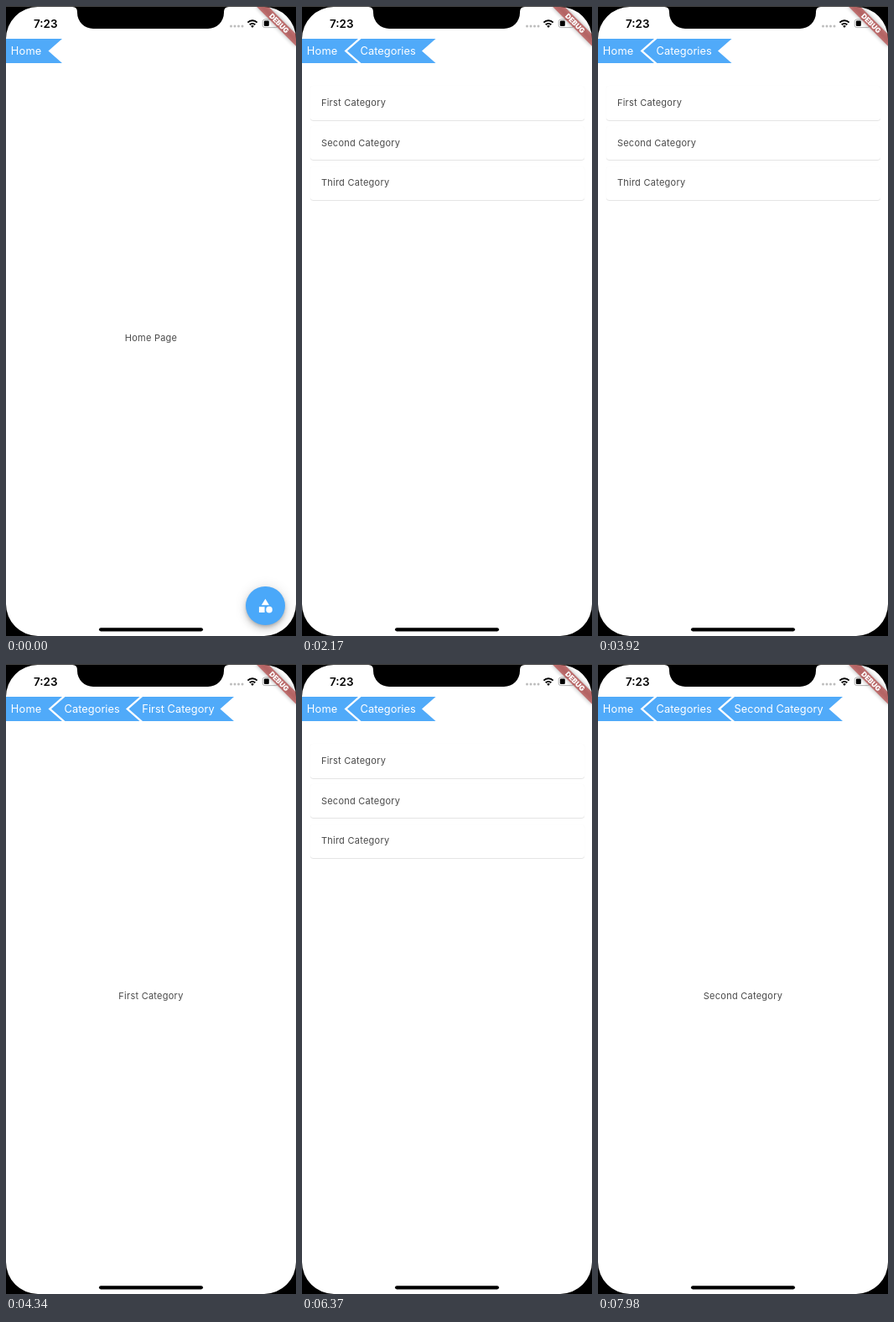
An HTML page for the animation above (8000 ms loop, 346 by 750 pixels).

```html
<!DOCTYPE html>
<html lang="en">
<head>
<meta charset="utf-8">
<title>Breadcrumb navigation</title>
<style>
html, body { margin: 0; width: 100%; height: 100%; overflow: hidden; background: #000; }
#stage { position: relative; width: 346px; height: 750px; overflow: hidden; font-family: Inter, Roboto, sans-serif; }
.page { position: absolute; inset: 0; background: #fff; }
.page + .page::before {
  content: ""; position: absolute; left: -10px; width: 10px; height: 100%;
  background: linear-gradient(90deg, #0000000c, #00000016 50%, #00000034);
}
svg { position: absolute; left: 0; top: 0; width: 346px; height: 750px; }
.crumb { fill: #50aaf9; }
.crumb + text { fill: #fff; font-size: 12.8px; }
.body { fill: #4a4a4a; font-size: 11px; letter-spacing: .25px; }
.card {
  position: absolute; left: 9.5px; width: 327px; height: 40.3px; border-radius: 3.3px; background: #fff;
  box-shadow: 0 .8px .6px #0000001c, 0 .4px 1.5px #0000000c;
}
.fab {
  position: absolute; left: 286px; top: 690.6px; width: 46.8px; height: 46.8px; border-radius: 50%; background: #4aa8f9;
  box-shadow: 0 2.5px 4.2px -.8px #0003, 0 5px 8.4px #00000024, 0 .8px 15px #0000001f;
}
</style>
</head>
<body>
<div id="stage">
  <div class="page" id="home"></div>
  <div class="page" id="list"></div>
  <div class="page" id="first"></div>
  <div class="page" id="second"></div>
  <svg viewBox="0 0 346 750">
    <text x="33" y="25.8" font-size="13.4" font-weight="600">7:23</text>
    <g fill="#bdbdbd">
      <circle cx="268.5" cy="24" r="1.5"/><circle cx="273" cy="24" r="1.5"/>
      <circle cx="277.5" cy="24" r="1.5"/><circle cx="282" cy="24" r="1.5"/>
    </g>
    <g fill="none" stroke="#000" stroke-width="2">
      <path d="M288.4 19.6a8 8 0 0 1 11.2 0"/>
      <path d="M290.7 22.2a4.8 4.8 0 0 1 6.6 0"/>
    </g>
    <path d="M292.1 23.8a2.8 2.8 0 0 1 3.8 0L294 25.9z"/>
    <rect x="306.2" y="16" width="18" height="9.6" rx="2.6" fill="none" stroke="#aaa" stroke-width=".9"/>
    <rect x="307.8" y="17.6" width="6" height="6.4" rx="1.2"/>
    <path d="M325.5 19.2q1.5 1.6 0 3.2z" fill="#aaa"/>
    <g transform="translate(346 .5) rotate(45)">
      <rect x="-33.5" y="23.4" width="67" height="10" fill="#0005" style="filter:blur(2.4px)"/>
      <rect x="-33.5" y="23.4" width="67" height="10" fill="#b73a3aa0"/>
      <text y="31.5" font-size="8.4" font-weight="900" fill="#fff" text-anchor="middle">DEBUG</text>
    </g>
    <rect x="111" y="740.2" width="124" height="4.2" rx="2.1"/>
    <path fill-rule="evenodd" d="M0 0H346V750H0ZM38 1A38 38 0 0 0 0 39V712A38 38 0 0 0 38 750H308A38 38 0 0 0 346 712V39A38 38 0 0 0 308 1Z"/>
    <path d="M79 1Q85 1 85 7V8A19 19 0 0 0 104 27H241A19 19 0 0 0 260 8V7Q260 1 266 1Z"/>
    <path d="M0 .5H346" stroke="#444"/>
  </svg>
</div>
<script>
const W = 346, LOOP = 8000, STEP = 70;
const $ = id => document.getElementById(id);
const svg = inner => `<svg viewBox="0 0 346 750">${inner}</svg>`;

const crumb = (label, left, right, x, gap = .05) => {
  const tail = left ? `L${left - 16.5} 53.5` : '';
  return `<path class="crumb" d="M${left} 39H${right}l-16.5 14.5l16.5 14.5H${left}${tail}Z"/>` +
    `<text x="${x}" y="58" letter-spacing="${gap}">${label}</text>`;
};
const middle = label => `<text class="body" x="173" y="398.8" text-anchor="middle">${label}</text>`;

const homeCrumb = crumb('Home', 0, 67, 5.8, .2);
const listCrumbs = homeCrumb + crumb('Categories', 70.5, 159.5, 69.5);
const names = ['First Category', 'Second Category', 'Third Category'];

$('home').innerHTML = svg(homeCrumb + middle('Home Page')) + '<div class="fab"></div>' + svg(
  `<g fill="#fff" transform="translate(299.4 704) scale(.836)">
    <path d="M12 2l-5.5 9h11zM3 13.5h8v8H3z"/><circle cx="17.5" cy="17.5" r="4.5"/></g>`);
$('list').innerHTML =
  names.map((n, i) => `<div class="card" style="top:${95.3 + i * 47.7}px"></div>`).join('') +
  svg(listCrumbs + names.map((n, i) =>
    `<text class="body" x="22.9" y="${119 + i * 47.7}">${n}</text>`).join(''));
$('first').innerHTML = svg(listCrumbs + crumb(names[0], 163, 272, 162.3) + middle(names[0]));
$('second').innerHTML = svg(listCrumbs + crumb(names[1], 163, 292, 162.5) + middle(names[1]));

const bezier = (x1, y1, x2, y2) => p => {
  if (p <= 0) return 0;
  if (p >= 1) return 1;
  const at = (a, b, s) => 3 * a * s * (1 - s) ** 2 + 3 * b * s * s * (1 - s) + s ** 3;
  let lo = 0, hi = 1;
  for (let i = 0; i < 24; i++) {
    const mid = (lo + hi) / 2;
    if (at(x1, x2, mid) < p) lo = mid; else hi = mid;
  }
  return at(y1, y2, lo);
};
const pushEase = bezier(.35, .91, .33, .97);
const swipeEase = bezier(.4, .16, .55, 1);
const push = (t, start) => pushEase((t - start) / 215);

// shown: how far a page is in; covered: how far the next page lies over it
function place(id, shown, covered) {
  const style = $(id).style;
  style.visibility = shown > 0 ? 'visible' : 'hidden';
  style.transform = `translateX(${W * (1 - shown) - W / 3 * covered}px)`;
}

function draw(now) {
  const t = Math.floor(now % LOOP / STEP) * STEP;
  const list = push(t, 1685);
  const first = push(t, 4122) - swipeEase((t - 5570) / 780);
  const second = push(t, 7412);
  place('home', 1, list);
  place('list', list, Math.max(first, second));
  place('first', first, 0);
  place('second', second, 0);
}

const begin = performance.now();
function tick() {
  draw(performance.now() - begin);
  requestAnimationFrame(tick);
}
tick();
</script>
</body>
</html>
```
